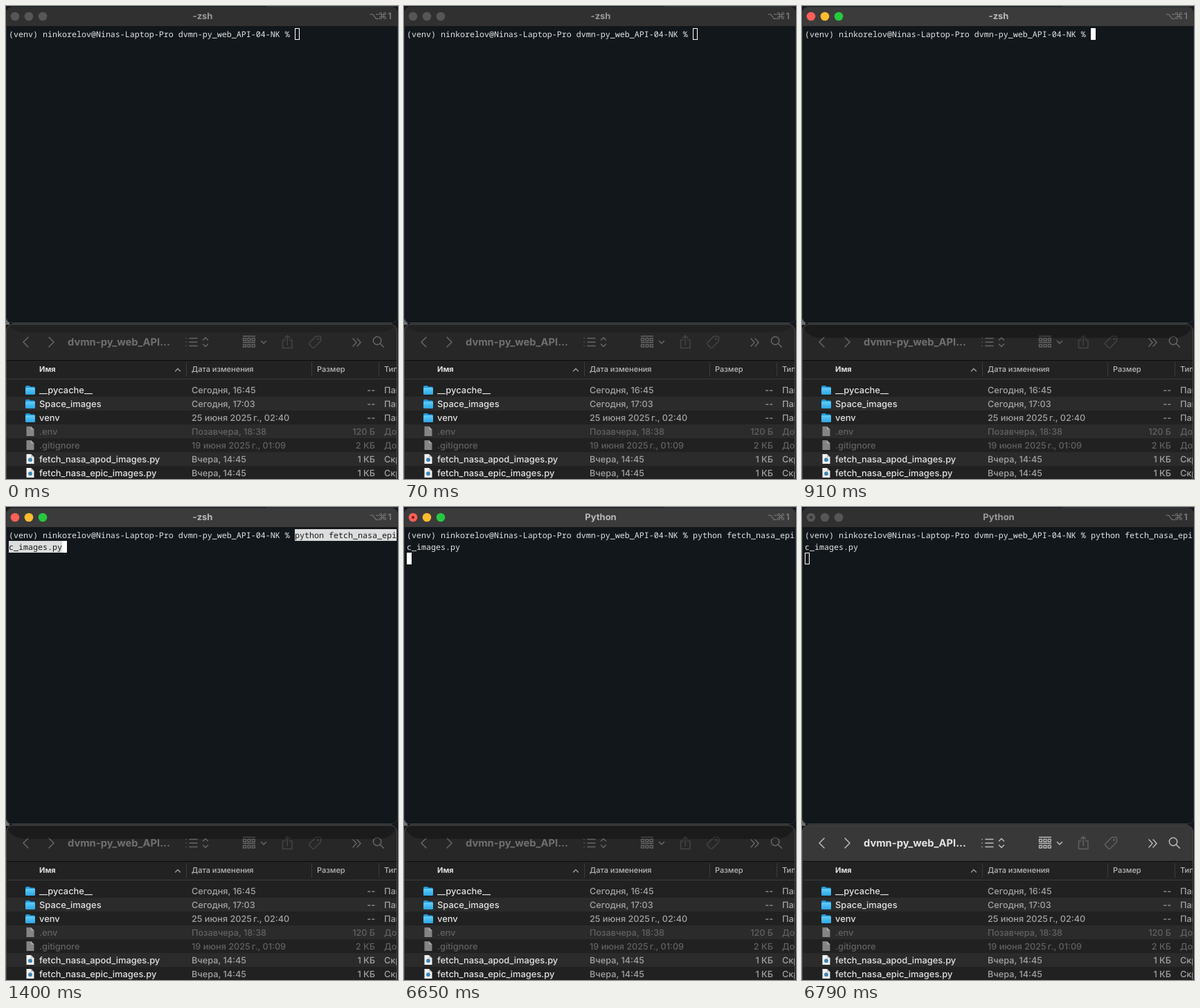
An HTML page for the animation above (8000 ms loop, 566 by 684 pixels).

```html
<!DOCTYPE html>
<html lang="ru">
<head>
<meta charset="utf-8">
<title>Terminal and file list</title>
<style>
  html, body { margin: 0; width: 100%; height: 100%; overflow: hidden; background: #15191d; }
  svg { display: block; width: 566px; height: 684px; }
  text { text-rendering: geometricPrecision; white-space: pre; font-family: Inter, "Open Sans", sans-serif; }
  .mono { font: 11.667px "Noto Sans Mono", "DejaVu Sans Mono", monospace; fill: #e4e6e7; }
  .title { font-size: 13px; font-weight: 700; text-anchor: middle; }
  .keys { font-family: "DejaVu Sans", sans-serif; font-size: 13px; fill: #7b7b7b; text-anchor: middle; }
  .head { font-size: 11px; font-weight: 500; fill: #b9b9b9; }
  .name { font-size: 12.9px; font-weight: 500; fill: #e3e3e3; }
  .info { font-size: 12.7px; fill: #a3a3a3; font-weight: 500; }
  .off { fill: #626262; }
  .end { text-anchor: end; }
  .line { fill: none; stroke-width: 1.5; stroke-linecap: round; stroke-linejoin: round; }
</style>
</head>
<body>
<svg viewBox="0 0 566 684">
  <defs>
    <linearGradient id="blue" x2="0" y2="1">
      <stop stop-color="#62cdfa"/><stop offset="1" stop-color="#2ba5e4"/>
    </linearGradient>
    <clipPath id="panelClip"><path d="M0 684V470a9 9 0 0 1 9-9H556a9 9 0 0 1 9 9V684z"/></clipPath>
    <clipPath id="termClip"><rect y="1" width="566" height="458" rx="9"/></clipPath>
    <g id="folder">
      <path d="M0 2a2 2 0 0 1 2-2h3.5l2 1.6H12a2 2 0 0 1 2 2V11a2 2 0 0 1-2 2H2a2 2 0 0 1-2-2z" fill="#239bd9"/>
      <rect y="3" width="14" height="10" rx="1.6" fill="url(#blue)"/>
    </g>
    <g id="plain">
      <path d="M1.5 0H8l4.5 4.5V14H1.5z" fill="#858585"/>
      <path d="M8 0v4.5h4.5z" fill="#a9a9a9"/>
    </g>
    <g id="script">
      <path d="M1.5 0H8l4.5 4.5V14H1.5z" fill="#f1f1f1"/>
      <path d="M8 0v4.5h4.5z" fill="#c5c5c5"/>
      <circle cx="7" cy="8.2" r="2.9" fill="#3d86b8"/>
    </g>
  </defs>

  <path d="M0 0H566V1H0z" fill="#171d22"/>
  <path d="M376 0H566V1H376z" fill="#30363b"/>
  <path d="M0 452h5v9H0z" fill="#6d6f70"/>

  <!-- file window -->
  <g clip-path="url(#panelClip)">
    <rect y="460" width="566" height="224" fill="#212121"/>
    <rect id="bar" y="460" width="566" height="52"/>
    <g id="tools" class="line">
      <path d="M32 479l-7 7 7 7M62 479l7 7-7 7"/>
      <path d="M265 480.5h11M265 486h11M265 491.5h11M260 480.5h.1M260 486h.1M260 491.5h.1"/>
      <path d="M284.5 483l3.5-3.5 3.5 3.5M284.5 489l3.5 3.5 3.5-3.5"/>
      <path id="grid" stroke-width="1.3"/>
      <path d="M368.5 484.5l3.5 3.5 3.5-3.5"/>
      <path d="M501 481l5 5.5-5 5.5M507 481l5 5.5-5 5.5" stroke-width="1.4"/>
      <circle cx="536" cy="484" r="5.7"/><path d="M540.3 488.3l5 5"/>
    </g>
    <g id="dimTools" class="line">
      <path d="M403 483h-3.5v11.5h13.5V483H409.5M406.2 490V476.500M402.7 480l3.5-3.5 3.5 3.5"/>
      <path d="M438 487l8.5-8.5q1-1 2.3-1h4q1.7 0 1.7 1.7v4q0 1.3-1 2.3L445 494q-1.2 1-2.3 0l-4.7-4.7q-1.1-1.1 0-2.300z"/>
      <circle cx="450.5" cy="481.5" r=".7"/>
    </g>
    <text id="folderName" x="89" y="491" font-size="14.7" font-weight="700">dvmn-py_web_API...</text>
    <rect id="shade" y="430" width="565" rx="26"/>
    <path d="M0 512H566V513H0z" fill="#0b0b0b"/>
    <rect y="513" width="566" height="27" fill="#222"/>
    <path d="M0 539.5H566M260.5 515V536M441.5 515V536M538.5 515V536" stroke="#3b3b3b"/>
    <path d="M244.5 528l3.5-3.5 3.5 3.5" class="line" stroke="#a5a5a5" style="stroke-width:1.2"/>
    <text class="head" x="48" y="529" style="font-weight:700;fill:#dedede">Имя</text>
    <text class="head" x="268" y="529">Дата изменения</text>
    <text class="head" x="449" y="529">Размер</text>
    <text class="head" x="546" y="529">Тип</text>
    <g id="rows"></g>
  </g>
  <path d="M.5 684V470a9.5 9.5 0 0 1 9.5-9.5H555a9.5 9.5 0 0 1 9.5 9.5V684" fill="none" stroke="#4b4b4b"/>

  <!-- terminal -->
  <g clip-path="url(#termClip)">
    <rect width="566" height="460" fill="#12171b"/>
    <rect id="termBar" y="1" width="566" height="28"/>
    <circle class="light" cx="13" cy="15" r="6.3"/>
    <circle class="light" cx="33" cy="15" r="6.3"/>
    <circle class="light" cx="53" cy="15" r="6.3"/>
    <circle id="dot" cx="13" cy="15" r="2"/>
    <text id="title" class="title" x="284" y="19.3"></text>
    <text class="keys" y="18.6"><tspan x="532">⌥</tspan><tspan x="544">⌘</tspan><tspan x="554" font-family="Inter, sans-serif" font-weight="600">1</tspan></text>
    <path id="mark" d="M417 32H564V49H417zM4 49H81V66H4z" fill="#dcdddd"/>
    <text class="mono" x="4" y="45">(venv) ninkorelov@Ninas-Laptop-Pro dvmn-py_web_API-04-NK % </text>
    <g id="command">
      <text class="mono cmd" x="417" y="45">python fetch_nasa_epi</text>
      <text class="mono cmd" x="4" y="62">c_images.py</text>
    </g>
    <rect id="cursor" stroke="#fff" width="6" height="16"/>
  </g>
  <rect x=".5" y="1.5" width="565" height="457" rx="9" fill="none" stroke="#2b3033"/>
  <path d="M9 458.5H557" stroke="#555a5d"/>
</svg>
<script>
const $ = id => document.getElementById(id);
const set = (el, attrs) => { for (const k in attrs) el.setAttribute(k, attrs[k]); };

const folder = "Папка", doc = "Документ", code = "Скрипт";
const rows = [
  ["folder", "__pycache__", "Сегодня, 16:45", "--", folder],
  ["folder", "Space_images", "Сегодня, 17:03", "--", folder],
  ["folder", "venv", "25 июня 2025\u202fг., 02:40", "--", folder],
  ["plain", ".env", "Позавчера, 18:38", "120 Б", doc],
  ["plain", ".gitignore", "19 июня 2025\u202fг., 01:09", "2 КБ", doc],
  ["script", "fetch_nasa_apod_images.py", "Вчера, 14:45", "1 КБ", code],
  ["script", "fetch_nasa_epic_images.py", "Вчера, 14:45", "1 КБ", code]
];

$("rows").innerHTML = rows.map(([icon, name, date, size, kind], i) => {
  const y = 545 + 20 * i, off = icon === "plain" ? "off" : "";
  const cell = (x, text, cls) => `<text class="${cls} ${off}" x="${x}" y="${y + 14.8}">${text}</text>`;
  const stripe = i % 2 ? `<rect y="${y}" width="566" height="20" fill="#2b2b2b"/>` : "";
  return stripe + `<use href="#${icon}" x="28" y="${y + (icon === "folder" ? 4 : 3)}"/>` +
    cell(48, name, "name") + cell(268, date, "info") + cell(533, size, "info end") + cell(546, kind, "info");
}).join("");

let grid = "M342.5 477.5h17M342.5 486.5h17";
for (const y of [480.5, 489.5])
  for (const x of [342.5, 348.9, 355.3]) grid += `M${x} ${y}h4v3.5h-4z`;
$("grid").setAttribute("d", grid);

// Time, active terminal, title, typed command, active file window
const steps = [
  { at: 0, live: false, title: "-zsh", phase: "empty", panel: false },
  { at: 840, live: true, title: "-zsh", phase: "empty", panel: false },
  { at: 1400, live: true, title: "-zsh", phase: "paste", panel: false },
  { at: 5460, live: true, title: "Python", phase: "run", panel: false },
  { at: 6790, live: false, title: "Python", phase: "run", panel: true }
];
const cursorAt = { empty: [417, 32], paste: [81, 49], run: [4, 66] };
const lights = [...document.querySelectorAll(".light")];
const commands = [...document.querySelectorAll(".cmd")];
const colors = ["#ff5f57", "#febc2e", "#28c840"];

function show({ live, title, phase, panel }) {
  const [x, y] = cursorAt[phase];
  lights.forEach((el, i) => set(el, { fill: live ? colors[i] : "#565656" }));
  set($("termBar"), { fill: live ? "#3b3b3b" : "#303030" });
  set($("dot"), { fill: live ? "#7d110c" : "#303030", visibility: phase === "run" ? "visible" : "hidden" });
  $("title").textContent = title;
  set($("title"), { fill: live ? "#b9b9b9" : "#999" });
  set($("mark"), { visibility: phase === "paste" ? "visible" : "hidden" });
  set($("command"), { visibility: phase === "empty" ? "hidden" : "visible" });
  commands.forEach(el => { el.style.fill = phase === "paste" ? "#17191b" : ""; });
  set($("cursor"), { x: x + .5, y: y + .5, fill: live ? "#fff" : "none" });

  set($("bar"), { fill: panel ? "#383838" : "#272727" });
  set($("tools"), { stroke: panel ? "#bcbcbc" : "#666" });
  set($("dimTools"), { stroke: panel ? "#616161" : "#444" });
  set($("folderName"), { fill: panel ? "#e6e6e6" : "#707070" });
  set($("shade"), {
    height: live ? 50 : 42,
    fill: live ? "rgba(0,0,0,.3)" : "rgba(0,0,0,.15)",
    visibility: panel ? "hidden" : "visible"
  });
}

const start = performance.now();
let shown;
function tick() {
  const t = (performance.now() - start) % 8000;
  const step = steps.findLast(s => s.at <= t) || steps[0];
  if (step !== shown) show(shown = step);
  requestAnimationFrame(tick);
}
tick();
</script>
</body>
</html>
```
